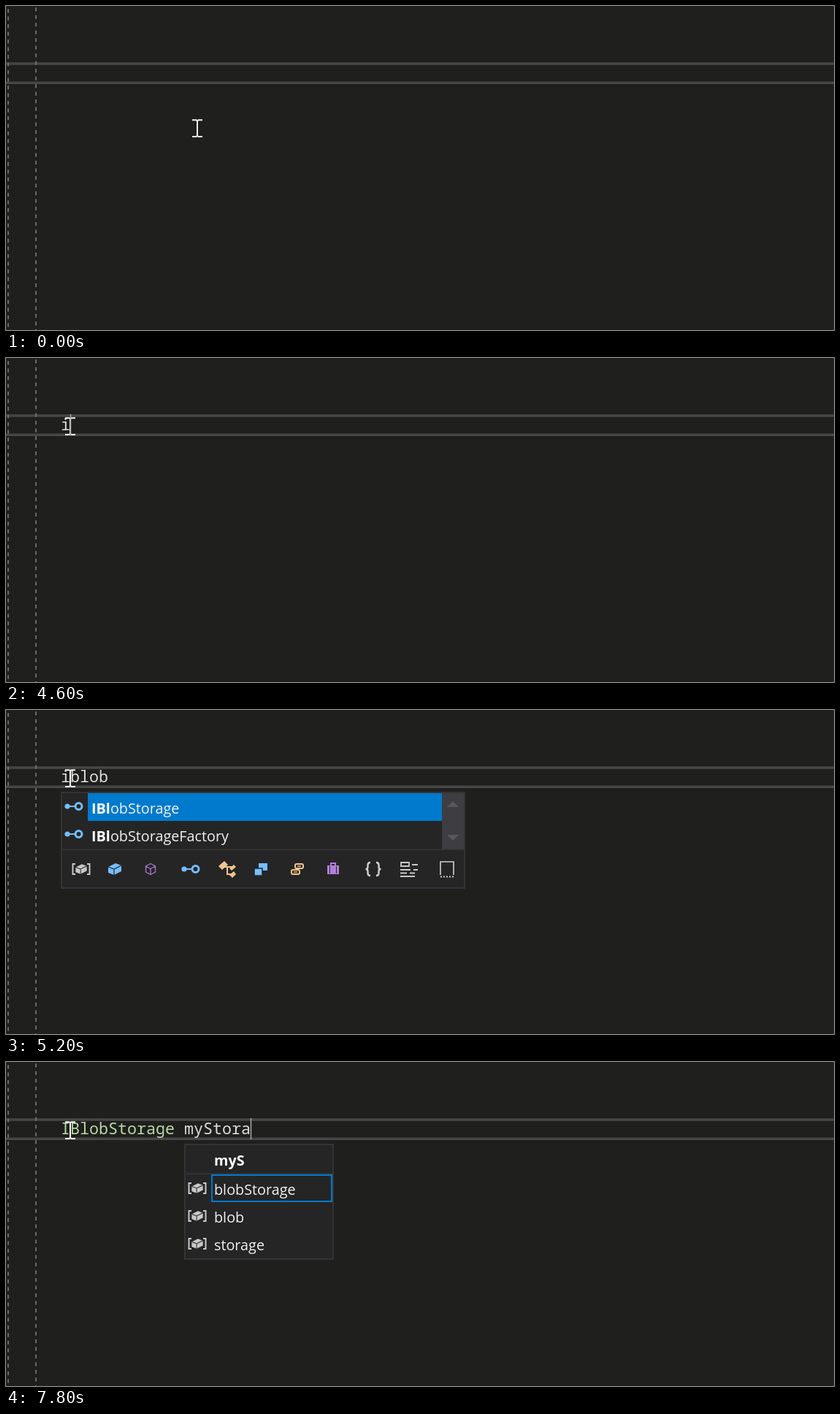
These frames come from a looping animation (1134x444 px, 8000 ms). An HTML page:

```html
<!DOCTYPE html>
<html lang="en">
<head>
<meta charset="utf-8">
<title>Code completion</title>
<style>
html, body { margin: 0; width: 100%; height: 100%; overflow: hidden; background: #1f1f1e; }
svg { display: block; width: 1134px; height: 444px; }
text { white-space: pre; }
.code { font: 21.67px "Noto Sans Mono", "DejaVu Sans Mono", monospace; fill: #dcdcdc; }
.item { font: 19.8px "Open Sans", "Noto Sans", sans-serif; fill: #f1f1f1; }
.item .hit { font-weight: 700; fill: #fff; }
.type { fill: #b8d7a3; }
</style>
</head>
<body>
<svg viewBox="0 0 1134 444">
  <defs>
    <g id="interface" fill="none" stroke="#75beff">
      <circle cx="-9" r="3.6" fill="#75beff" stroke="none"/>
      <path d="M-6 0H2" stroke-width="2"/>
      <circle cx="6.5" r="4.5" stroke-width="3"/>
    </g>
    <g id="snippet" fill="none" stroke="#d0d0d0" stroke-width="1.6">
      <path d="M-9 8V-10H9V8"/>
      <path d="M-9 10.5H10" stroke-width="2" stroke-dasharray="2 2"/>
    </g>
    <g id="cube">
      <path d="M-9 -3L1 -8L9 -5V3L-1 8L-9 5Z"/>
      <path d="M-9 -3L-1 0L9 -5M-1 0V8" fill="none" stroke="#252526" stroke-width="1.2"/>
    </g>
    <g id="variable" fill="#c8c8c8">
      <path d="M-8 -7H-11.5V7H-8M8 -7H11.5V7H8" fill="none" stroke="#c8c8c8" stroke-width="2"/>
      <use href="#cube" transform="scale(.85)"/>
    </g>
    <g id="struct" fill="none" stroke="#a074c4" stroke-width="1.4">
      <path d="M-6.5 -4L0 -7.5L6.5 -4V4L0 7.5L-6.5 4ZM-6.5 -4L0 -.5L6.5 -4M0 -.5V7.5"/>
    </g>
    <g id="class" fill="#f0c58c">
      <path d="M-12 -4L-4 -11L1 -6L-7 1Z"/>
      <path d="M-4 -3H6M0 -3V7H6" fill="none" stroke="#f0c58c" stroke-width="2"/>
      <path d="M3 -1L9 -6L12 -3L6 2ZM3 8L9 3L12 7L7 12Z"/>
    </g>
    <g id="enum" fill="#75beff">
      <path d="M-3 -8H9V2H-3Z"/>
      <path d="M-9 -1H2V9H-9Z" stroke="#252526" stroke-width="1.5"/>
    </g>
    <g id="delegate" fill="none" stroke="#f0c58c" stroke-width="2">
      <rect x="-3" y="-7" width="11" height="6" rx="2"/>
      <rect x="-8" y="1" width="11" height="6" rx="2"/>
      <path d="M0 -4H5M-5 4H0" stroke-width="1.3"/>
    </g>
    <g id="case">
      <path d="M-8 -5H8V7H-8Z" fill="#b180d7"/>
      <path d="M-3 -5V-8H3V-5M-4.5 -5V7M4.5 -5V7" fill="none" stroke="#b180d7" stroke-width="2"/>
      <path d="M-4.5 -4V6M4.5 -4V6" stroke="#252526"/>
    </g>
    <g id="braces" fill="none" stroke="#d0d0d0" stroke-width="2.4">
      <path id="brace" d="M-4 -9Q-7.5 -9 -7.5 -5.5V-3Q-7.5 0 -10.5 0Q-7.5 0 -7.5 3V5.5Q-7.5 9 -4 9"/>
      <use href="#brace" transform="scale(-1 1)"/>
    </g>
    <g id="lines" fill="none" stroke="#c8c8c8" stroke-width="1.8">
      <path d="M-11 -9H0V-4H-11ZM4 -6H12M-12 1H2M6 1H12M-12 5.5H-3M1 5.5H8M-12 10H8"/>
    </g>
  </defs>
  <rect width="1134" height="444" fill="#1f1f1e"/>
  <path d="M0 79H1134M0 105.2H1134" stroke="#474747" stroke-width="3.5"/>
  <g stroke="#7c7c7c" stroke-width="1.6" stroke-dasharray="5.25 5.25">
    <path d="M3 4V444"/>
    <path d="M41 2V444"/>
  </g>
  <g id="scene"></g>
  <path id="pointer" d="M-7 -11.2H-1.5L0 -10L1.5 -11.2H7M0 -10V10.5M-7 11.5H-1.5L0 10.3L1.5 11.5H7" fill="none" stroke="#f4f4f4" stroke-width="2"/>
  <rect id="caret" y="77" width="1.6" height="29" fill="#a2a2a2"/>
</svg>
<script>
const LOOP = 8000, LEFT = 75, CHAR = 13, ROW = 38, TOP = 114;
const $ = id => document.getElementById(id);

const interfaces = ['IEqualityComparer<>', 'IEquatable<>', 'IExternalModule', 'if', 'IFormatProvider',
  'IFormattable', 'IGrouping<>', 'IList<>', 'ILookup<>'];
const blobTypes = ['IBlobStorage', 'IBlobStorageFactory'];
const filters = { variable: 103, cube: 149, struct: 198, interface: 253, class: 303, enum: 349,
  delegate: 399, case: 448, braces: 503, lines: 552, snippet: 604 };

const esc = s => s.replace(/</g, '&lt;').replace(/>/g, '&gt;');
const rect = (x, y, w, h, fill, more = '') =>
  `<rect x="${x}" y="${y}" width="${w}" height="${h}" fill="${fill}" ${more}/>`;
const icon = (id, x, y, more = '') => `<use href="#${id}" x="${x}" y="${y}" ${more}/>`;
const label = (x, y, s, hits = 0) =>
  `<text class="item" x="${x}" y="${y}"><tspan class="hit">${esc(s.slice(0, hits))}</tspan>${esc(s.slice(hits))}</text>`;
const panel = (x, w, h) => rect(x + 1, 113, w - 2, h - 2, '#252526', 'stroke="#343436" stroke-width="2"');
const arrow = (y, dir, fill) => `<path d="M604 ${y}H620L612 ${y - 8 * dir}Z" fill="${fill}"/>`;

function completions(items, selected, hits) {
  const short = items.length < 5;
  const barHeight = short ? 77 : 340;
  let out = panel(75, 554, short ? 133 : 360);
  out += rect(112, TOP + ROW * selected, 485, ROW, '#007acc') + rect(597, TOP, 30, barHeight, '#3e3e42');
  out += arrow(133, 1, short ? '#58585c' : '#a0a0a0');
  out += short ? arrow(171, -1, '#58585c') : arrow(437, -1, '#a0a0a0') + rect(604, 255, 16, 14, '#686868');
  items.forEach((name, i) => {
    const y = 132 + ROW * i;
    out += name === 'if' ? icon('snippet', 94, y) : icon('interface', 93, y);
    out += label(117, y + 10, name, hits);
  });
  if (short) {
    out += rect(77, 190.5, 550, 1.5, '#343436');
    for (const [id, x] of Object.entries(filters)) out += icon(id, x, 218, id === 'cube' ? 'fill="#75beff"' : '');
  }
  return out;
}

function nameHints(typed) {
  let out = panel(244, 205, 159) + label(285, 142, typed, typed.length);
  out += rect(247, 152.5, 200, 1.5, '#38383a');
  out += rect(282, 155, 164, 36, 'none', 'stroke="#007acc" stroke-width="2"');
  ['blobStorage', 'blob', 'storage'].forEach((name, i) => {
    out += icon('variable', 262, 173 + ROW * i) + label(285, 182 + ROW * i, name);
  });
  return out;
}

function squiggle() {
  let d = 'M76 107';
  for (let x = 78, up = true; x <= 234; x += 3, up = !up) d += `L${x} ${up ? 104 : 107}`;
  return `<path d="${d}" fill="none" stroke="#e0443c" stroke-width="1.4"/>`;
}

// Each step changes only the listed parts of the state.
const steps = [
  { t: 0, at: [262, 167.5], text: '', typed: '', caret: false, popup: '', wavy: false },
  { t: 200, at: [247, 151.5] },
  { t: 3000, at: [228, 120.5] },
  { t: 3200, at: [91, 107.5] },
  { t: 3400, at: [88, 93.5] },
  { t: 3800, caret: true },
  { t: 4200, caret: false },
  { t: 4600, text: 'i', caret: true },
  { t: 4800, text: 'ib', popup: completions(interfaces, 3, 1) },
  { t: 5000, text: 'ibl', popup: completions(blobTypes, 0, 2) },
  { t: 5200, text: 'iblob', popup: completions(blobTypes, 0, 3), caret: false },
  { t: 5400, popup: completions(blobTypes, 0, 5) },
  { t: 5600, caret: true },
  { t: 5800, text: 'IBlobStorage', popup: '' },
  { t: 6200, caret: false },
  { t: 6400, typed: 'IBlobStorage', text: '', wavy: true },
  { t: 6800, text: ' m', caret: true, wavy: false },
  { t: 7000, text: ' my', popup: nameHints('m') },
  { t: 7200, popup: nameHints('my') },
  { t: 7400, text: ' myS', caret: false },
  { t: 7600, text: ' mySto', popup: nameHints('myS') },
  { t: 7800, text: ' myStora', caret: true }
];
let state = {};
const states = steps.map(step => state = { ...state, ...step });

let shown;
function draw(s) {
  const length = s.typed.length + s.text.length;
  $('scene').innerHTML =
    `<text class="code" x="${LEFT}" y="99"><tspan class="type">${s.typed}</tspan>${s.text}</text>` +
    (s.wavy ? squiggle() : '') + s.popup;
  $('pointer').setAttribute('transform', `translate(${s.at})`);
  $('caret').setAttribute('x', LEFT + CHAR * length - (length ? 0.3 : 1));
  $('caret').style.display = s.caret ? '' : 'none';
}

const start = performance.now();
function tick() {
  const t = (performance.now() - start) % LOOP;
  const now = states.filter(s => s.t <= t).pop();
  if (now !== shown) draw(shown = now);
  requestAnimationFrame(tick);
}
tick();
</script>
</body>
</html>
```
